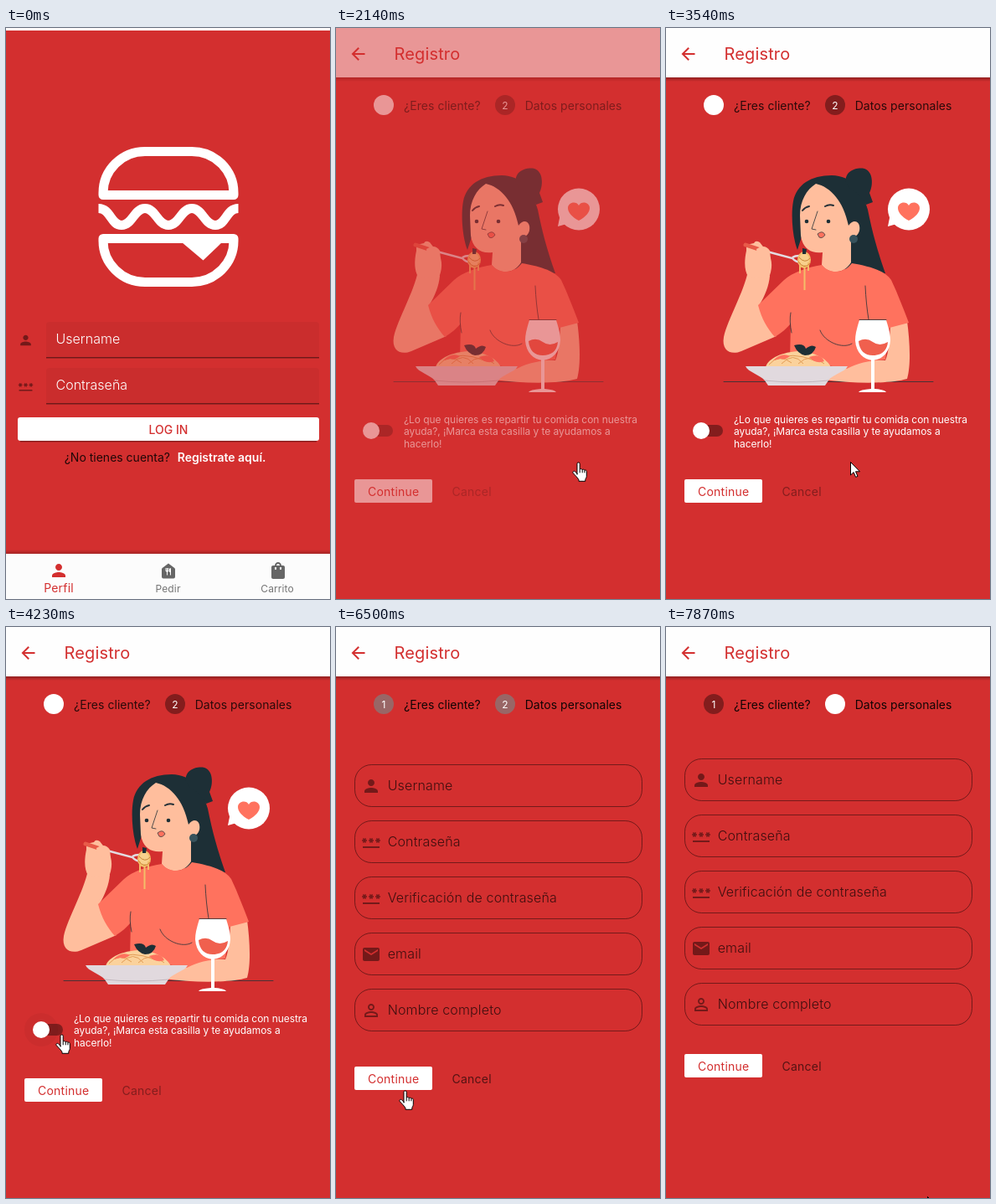
Write an HTML page that moves like this. It is 387 px wide and 682 px high and loops after 8 s.

```html
<!DOCTYPE html>
<html lang="es">
<head>
<meta charset="utf-8">
<title>Registro</title>
<style>
html, body { margin: 0; height: 100%; overflow: hidden; background: #d32f2f; }
svg { display: block; width: 100vw; height: 100vh; }
text { font: 400 14px Inter, sans-serif; white-space: pre; }
.mid { text-anchor: middle; }
.label { font-size: 16px; font-weight: 300; }
.small { font-size: 12px; }
.line { fill: none; stroke: #263238; stroke-width: .8; stroke-linecap: round; }
.red { fill: #d32f2f; }
.skin { fill: #ffbe9d; }
.hair { fill: #1d2f36; }
.coral { fill: #ff725e; }
</style>
</head>
<body>
<svg viewBox="0 0 387 682">
<defs>
  <path id="person" d="M12 12c2.21 0 4-1.79 4-4s-1.79-4-4-4-4 1.79-4 4 1.79 4 4 4zm0 2c-2.67 0-8 1.34-8 4v2h16v-2c0-2.66-5.33-4-8-4z"/>
  <path id="outline" d="M12 5.900c1.160 0 2.100.94 2.100 2.100s-.94 2.100-2.100 2.100S9.900 9.160 9.900 8s.94-2.100 2.100-2.100m0 9c2.970 0 6.100 1.460 6.100 2.100v1.100H5.900V17c0-.64 3.130-2.100 6.100-2.100M12 4C9.790 4 8 5.790 8 8s1.790 4 4 4 4-1.790 4-4-1.790-4-4-4zm0 9c-2.670 0-8 1.340-8 4v3h16v-3c0-2.660-5.330-4-8-4z"/>
  <path id="mail" d="M20 4H4c-1.100 0-2 .9-2 2v12c0 1.100.9 2 2 2h16c1.100 0 2-.9 2-2V6c0-1.100-.9-2-2-2zm0 4l-8 5-8-5V6l8 5 8-5v2z"/>
  <path id="star" d="M3.150 12.950L4 11.470l.85 1.480 1.300-.75-.85-1.480H7v-1.500H5.300l.85-1.470L4.850 7 4 8.470 3.150 7l-1.300.75.85 1.470H1v1.500h1.700l-.85 1.480z"/>
  <g id="pass"><path d="M2 17h20v2H2z"/><use href="#star"/><use href="#star" x="8"/><use href="#star" x="16"/></g>
  <path id="back" d="M20 11H7.830l5.590-5.590L12 4l-8 8 8 8 1.410-1.410L7.830 13H20z"/>
  <path id="bag" d="M18 6h-2c0-2.210-1.790-4-4-4S8 3.790 8 6H6c-1.100 0-2 .9-2 2v12c0 1.100.9 2 2 2h12c1.100 0 2-.9 2-2V8c0-1.100-.9-2-2-2zm-8 4c0 .55-.45 1-1 1s-1-.45-1-1V8h2v2zm2-6c1.100 0 2 .9 2 2h-4c0-1.100.9-2 2-2zm4 6c0 .55-.45 1-1 1s-1-.45-1-1V8h2v2z"/>
  <g id="food"><path d="M12 3L4.700 8.500Q4 9 4 10v9q0 2 2 2h12q2 0 2-2v-9q0-1-.7-1.500z"/><path fill="#fcfcfc" d="M12.500 11.500c0 .83-.67 1.500-1.500 1.500v4h-1v-4c-.83 0-1.500-.67-1.500-1.500v-3h1v3h.5v-3h1v3h.5v-3h1zM15 17h-1v-3.500h-1V10.500c0-1.100.9-2 2-2z"/></g>
  <linearGradient id="down" x2="0" y2="1"><stop stop-opacity=".32"/><stop offset="1" stop-opacity="0"/></linearGradient>
  <linearGradient id="up" y1="1" x2="0" y2="0"><stop stop-opacity=".22"/><stop offset="1" stop-opacity="0"/></linearGradient>
  <clipPath id="link"><rect x="197" y="499" width="121" height="27" rx="3"/></clipPath>
</defs>
<rect width="387" height="682" class="red"/>

<g id="login">
  <rect width="387" height="3" fill="#fff"/>
  <g fill="none" stroke="#fff" stroke-width="11" stroke-linejoin="round">
    <path d="M116 199.500V197A50 49.500 0 0 1 166 147.500H222A50 49.500 0 0 1 272 197V199.500Z"/>
    <path d="M110.500 215.500C125 215.500 125 235.500 138 235.500S153 215.500 166 215.500 181 235.500 194 235.500 209 215.500 222 215.500 237 235.500 250 235.500 263 215.500 277.500 215.500"/>
    <path d="M116 251.500H272V254A50 49.500 0 0 1 222 303.500H166A50 49.500 0 0 1 116 254Z"/>
  </g>
  <path d="M210 256H258L235.500 277.500Z" fill="#fff"/>
  <g id="boxes"></g>
  <path d="M17 493H371" stroke="#000" stroke-opacity=".35" stroke-width="3"/>
  <rect x="14" y="465" width="360" height="28" rx="3" fill="#fff"/>
  <text x="194" y="485" class="mid red" style="font-weight:500">LOG IN</text>
  <text x="69.700" y="518" fill-opacity=".85">¿No tienes cuenta?</text>
  <g clip-path="url(#link)" fill="#fff">
    <rect id="hover" x="197" y="499" width="121" height="27" opacity=".05"/>
    <circle id="ripple" cx="286" cy="514" r="21" opacity=".07"/>
  </g>
  <text x="204.700" y="518" fill="#fff" style="font-weight:600">Registrate aquí.</text>
  <rect y="623" width="387" height="5" fill="url(#up)"/>
  <rect y="628" width="387" height="54" fill="#fcfcfc"/>
  <g class="red"><use href="#person" x="51" y="636"/><text x="63" y="674" class="mid" letter-spacing=".2">Perfil</text></g>
  <g fill="#666"><use href="#food" x="182" y="636.500"/><use href="#bag" x="313" y="636"/></g>
  <g fill="#757575"><text x="193.500" y="674" class="mid small" letter-spacing=".15">Pedir</text><text x="324" y="674" class="mid small" letter-spacing=".1">Carrito</text></g>
</g>

<g id="register">
  <rect y="59" width="387" height="5" fill="url(#down)"/>
  <rect width="387" height="59" fill="#fefefe"/>
  <g class="red"><use href="#back" x="14.500" y="19"/><text x="69.500" y="38" style="font-size:20px" letter-spacing=".15">Registro</text></g>
  <circle id="dot1" cx="57" cy="92" r="12"/>
  <circle id="dot2" cx="202" cy="92" r="12"/>
  <g fill="#fff"><text x="57" y="96.500" class="mid small">1</text><text x="202" y="96.500" class="mid small">2</text></g>
  <g id="titles"><text x="81" y="98" letter-spacing=".05">¿Eres cliente?</text><text x="225.700" y="98" letter-spacing=".05">Datos personales</text></g>

  <g id="intro">
    <path class="line" d="M69 422.500H319"/>
    <path class="hair" d="M157 265C151 250 149 222 152 207 156 187 173 176 198 176 222 177 234 192 241 217 246 242 252 265 262 293L205 287 165 240Z"/>
    <path class="hair" d="M215 184C213 172 226 166 237 168 247 171 248 187 243 197L247 208 239 211C236 204 228 197 220 192Z"/>
    <path class="skin" d="M160 224C160 206 168 193 179 186 197 190 212 207 218 236 224 227 233 231 231 242 229 250 223 250 221 248V280C212 295 194 294 186 283L187 268C172 270 163 262 161 248Z"/>
    <path class="line" stroke-linejoin="round" d="M181 219L174 240 179 241"/>
    <path class="line" style="stroke-width:2" d="M163 218Q166 214 171 213M190 213Q195 210 200 212"/>
    <circle class="hair" cx="168" cy="231" r="2.300"/><circle class="hair" cx="194" cy="231" r="2.300"/>
    <path class="coral" stroke="#263238" stroke-width=".7" d="M181 246Q187 241 190 247 187 252 183 250Z"/>
    <circle cx="224" cy="252" r="5" fill="#37525c"/>
    <path class="skin" d="M268 354C267 374 266 388 262 397 240 396 218 400 205 404L188 420C225 425 268 425 288 419 293 402 291 372 288 350Z"/>
    <path class="skin" d="M98 290C93 316 74 347 69 369 66 386 78 391 90 386L132 368 112 330C118 320 123 308 124 296Z"/>
    <path class="coral" d="M186 283C168 286 151 292 141 301L110 331C114 347 121 359 130 369 138 364 144 359 149 353L148 395 216 407C230 399 248 397 262 396L267 358 290 352C283 334 277 318 269 301 261 289 240 284 222 281 212 294 195 294 186 283Z"/>
    <path class="line" d="M238 308Q239 330 242 348M184 361C189 375 211 384 222 377M149 340Q147 350 150 364"/>
    <path class="skin" d="M96 266C93 280 94 290 98 297L122 300C127 290 128 277 122 269L112 256Q107 253 105 257L96 259Z"/>
    <path d="M95 259L119 267" fill="none" stroke="#e85b49" stroke-width="5" stroke-linecap="round"/>
    <path d="M117 266L151 275Q157 282 167 279M151 274Q157 270 170 274" fill="none" stroke="#e3dbe0" stroke-width="2.500"/>
    <path class="skin" d="M108 264Q118 257 124 266L125 276 109 274Z"/>
    <g fill="none" stroke="#f4bd69" stroke-width="2">
      <ellipse cx="165" cy="277" rx="7" ry="9" fill="#f8d08c"/>
      <path d="M160 280V293M165.500 283V313M170 280V290"/>
      <path d="M159 274Q166 282 172 275M158 279Q165 289 172 281" stroke="#c98536" stroke-width="1"/>
    </g>
    <path class="hair" d="M163 263L168 264 167 270 163 270Z"/>
    <path d="M119 405C122 394 140 387 158 386 178 387 192 395 197 405Z" fill="#fbd29c"/>
    <path d="M123 402Q135 388 150 400M138 401Q152 386 164 401M158 401Q172 387 189 401M130 396Q150 386 177 397" fill="none" stroke="#e29c56" stroke-width="1"/>
    <path class="coral" d="M128 397Q138 387 148 392 142 397 137 395ZM171 393Q185 388 189 398 179 402 171 393Z"/>
    <path class="hair" d="M153 379Q165 376 167 383 174 377 179 381 176 391 166 391 157 389 153 379Z"/>
    <path d="M95 404H217C214 411 198 414 194 421L190 427H122L118 421C112 414 98 411 95 404Z" fill="#e1d9de"/>
    <path d="M118 421Q155 425 194 421" fill="none" stroke="#b9aeb5" stroke-width=".8"/>
    <path d="M231 349Q226 364 226 373C227 388 236 396 247 397 258 396 267 388 268 373Q268 364 263 349Z" fill="#fff"/>
    <path d="M230 374Q239 369 247 375T265 375C264 386 257 391 247 391 237 391 231 385 230 374Z" fill="#f0604e"/>
    <path d="M230 435Q231 432 245 431V396H249V431Q262 432 263 435Z" fill="#fff"/>
    <path class="line" d="M231 348.500H263"/>
    <circle cx="290" cy="216.500" r="25" fill="#fff"/>
    <path d="M268 222L265 237 279 233Z" fill="#fff"/>
    <path class="coral" d="M290 230C282 226 277 220 277 215 277 208 287 206 290 212 293 206 303 208 303 215 303 220 298 226 290 230Z"/>

    <rect x="35" y="474" width="33" height="14" rx="7" fill-opacity=".38"/>
    <circle id="halo" cy="481" r="20" fill-opacity=".04"/>
    <circle id="thumb" cy="481" r="10"/>
    <g fill="#fff" letter-spacing="-.06">
      <text class="small" x="81" y="471.500">¿Lo que quieres es repartir tu comida con nuestra</text>
      <text class="small" x="81" y="486">ayuda?, ¡Marca esta casilla y te ayudamos a</text>
      <text class="small" x="81" y="501">hacerlo!</text>
    </g>
  </g>

  <g id="form"></g>
  <g id="actions">
    <rect x="22" width="93" height="28" rx="2" fill="#fff"/>
    <text x="68.700" y="20" class="mid red" letter-spacing=".25">Continue</text>
    <text id="cancel" x="138.500" y="20" letter-spacing=".25">Cancel</text>
  </g>
</g>

<g id="cursor" fill="#fff" stroke="#000" stroke-linejoin="round">
  <path id="arrow" d="M.5.5V16L4.100 12.600 6.600 18.400 9 17.400 6.500 11.800H11.500Z"/>
  <path id="hand" transform="translate(-7 .3)" d="M6 15V2.200a1.600 1.600 0 0 1 3.200 0V9c.4-1 2.700-1 3 .5.5-.9 2.500-.8 2.700.7.5-.8 2.400-.6 2.400 1.200V17c0 2-1.500 3-1.500 4.500V23H8v-1.500C7 19 3.500 16 1.200 13.300c-1-1.500.8-3 2.300-1.900L6 14zM9.200 9v4M12.200 9.500V13M14.900 10.200V13"/>
</g>
</svg>
<script>
const $ = id => document.getElementById(id);
const set = (id, attrs) => { for (const k in attrs) $(id).setAttribute(k, attrs[k]); };
const show = (id, on) => set(id, { visibility: on ? 'inherit' : 'hidden' });
const icon = (name, x, y, s) =>
  `<use href="#${name}" fill-opacity=".45" transform="translate(${x - s / 2} ${y - s / 2}) scale(${s / 24})"/>`;

$('boxes').innerHTML = [['person', 'Username'], ['pass', 'Contraseña']].map(([name, label], i) => {
  const y = 351 + 55 * i;
  return icon(name, 23.5, y + 22, 19) +
    `<path d="M48 ${y + 43}V${y + 4}q0-4 4-4H370q4 0 4 4V${y + 43}z" fill-opacity=".045"/>
     <path d="M48 ${y + 42.8}H374" stroke="#000" stroke-opacity=".45" stroke-width="1.4"/>
     <text class="label" x="59.5" y="${y + 26}" fill="#fff">${label}</text>`;
}).join('');

$('form').innerHTML = [['person', 'Username'], ['pass', 'Contraseña'], ['pass', 'Verificación de contraseña'],
  ['mail', 'email'], ['outline', 'Nombre completo']].map(([name, label], i) => {
  const y = 157 + 67 * i;
  return `<rect x="22.5" y="${y + .5}" width="343" height="50" rx="20" fill="none" stroke="#000" stroke-opacity=".45"/>` +
    icon(name, 42, y + 26, 24) +
    `<text class="label" x="61.7" y="${y + 31}" fill-opacity=".7" letter-spacing=".15">${label}</text>`;
}).join('');

// Each row: start time, then the values held from there on
const at = (rows, t) => rows.reduce((cur, row) => t >= row[0] ? row : cur);
const pointer = [
  [0], [500, 345, 553, 'arrow'], [620, 307, 532, 'arrow'], [770, 295, 524, 'hand'],
  [920, 290, 520, 'hand'], [1220, 289, 518, 'hand'], [3540, 220, 518, 'arrow'],
  [3690, 208, 517, 'arrow'], [3840, 111, 502, 'arrow'], [3990, 80, 493, 'hand'],
  [4110, 69, 488, 'hand'], [4230, 66, 486, 'hand'], [5990, 69, 499, 'hand'],
  [6110, 79, 541, 'hand'], [6230, 82, 552, 'hand'], [6380, 82, 553, 'hand'],
  [6770, 82, 553, 'arrow'], [7300, 98, 561, 'arrow'], [7420, 143, 582, 'arrow'],
  [7570, 244, 625, 'arrow'], [7720, 274, 647, 'arrow'], [7870, 312, 680, 'arrow']
];
const toggle = [[0, 0], [4540, .02], [4660, .05], [4810, 1], [5870, .55], [5990, 0]];
const step = [[0, 0], [6380, .1], [6500, .5], [6620, 1]];

// Blend from solid white to translucent black
const dotFill = p => ({ fill: `rgb(${Array(3).fill(Math.round(255 * (1 - p)))})`, 'fill-opacity': 1 - .62 * p });

function draw(t) {
  show('login', t < 2140);
  show('register', t >= 2140);
  set('register', { opacity: t < 2290 ? .5 : 1 });
  show('hover', t >= 770 && t < 2140);
  show('ripple', t >= 1990 && t < 2140);

  const on = at(toggle, t)[1], x = 42 + 20 * on, grey = Math.round(255 - 125 * on);
  set('thumb', { cx: x, fill: `rgb(${grey},${grey},${grey})` });
  set('halo', { cx: x });
  show('halo', t >= 3990 && t < 6110);

  const p = at(step, t)[1];
  set('dot1', dotFill(p));
  set('dot2', dotFill(1 - p));
  set('titles', { 'fill-opacity': p < .5 ? .8 : .92 });
  set('intro', { opacity: Math.max(0, 1 - 2 * p) });
  set('form', { opacity: Math.min(1, 2 * p), transform: `translate(0 ${14 * (1 - p)})` });
  set('actions', { transform: `translate(0 ${Math.round(539 - 29 * p)})` });
  set('cancel', { 'fill-opacity': p < .5 ? .38 : .6 });

  const [, cx, cy, kind] = at(pointer, t);
  show('arrow', kind === 'arrow');
  show('hand', kind === 'hand');
  if (kind) set('cursor', { transform: `translate(${cx} ${cy})` });
}

function tick() {
  draw(performance.now() % 8000);
  requestAnimationFrame(tick);
}
tick();
</script>
</body>
</html>
```
